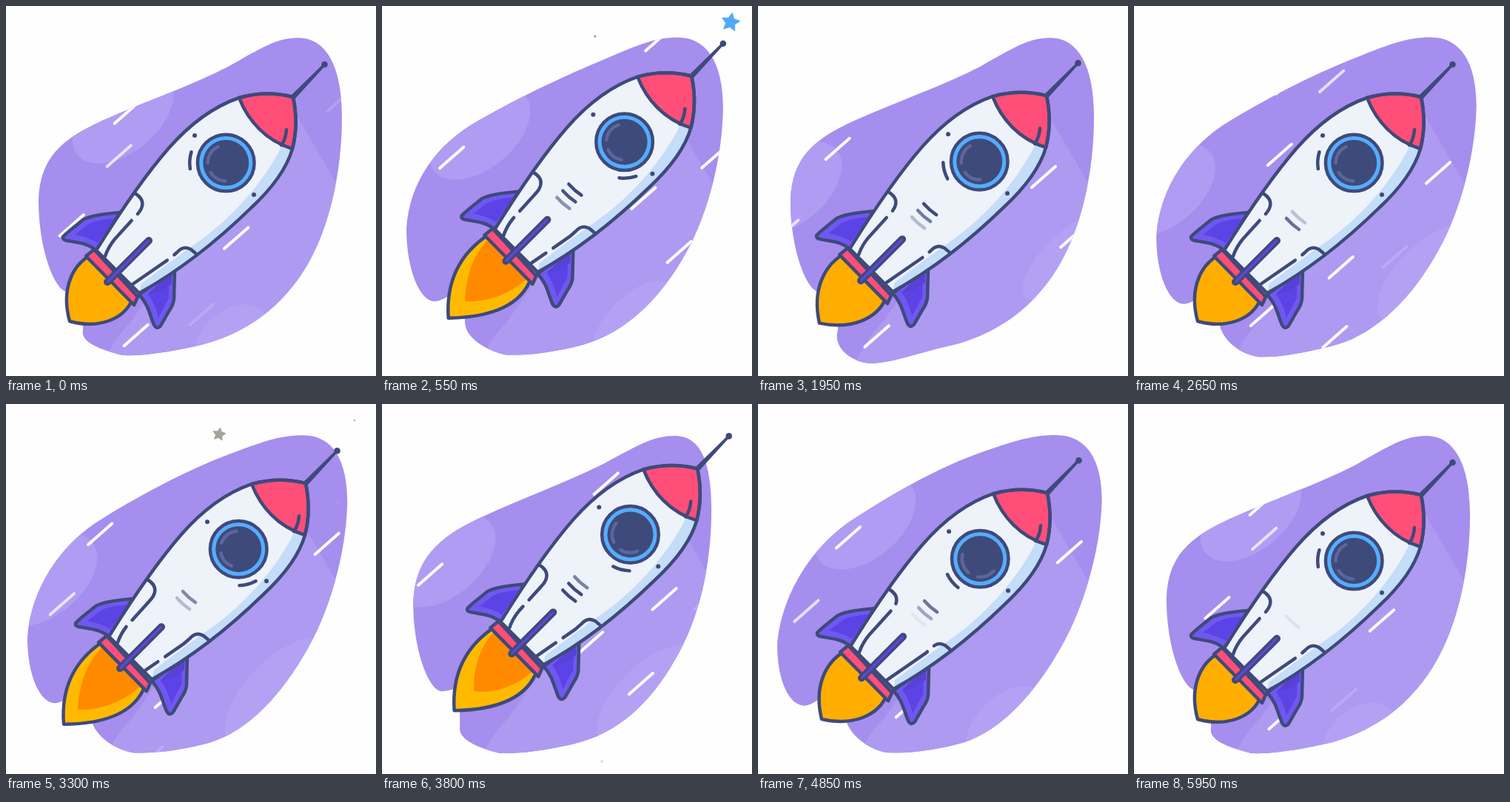
An HTML page that plays this animation: 500 px wide and 500 px high, repeating every 6050 ms.

```html
<!DOCTYPE html>
<html lang="en">
<head>
<meta charset="utf-8">
<title>Rocket</title>
<style>
  html, body { margin: 0; width: 100%; height: 100%; overflow: hidden; background: #fefefe; }
  svg { display: block; width: 100vw; height: 100vh; }
  .ink { stroke: #3e4a7a; stroke-width: 4.5; stroke-linecap: round; stroke-linejoin: round; }
  .line { fill: none; }
  .dark { fill: #3e4a7a; }
</style>
</head>
<body>
<svg viewBox="0 0 500 500">
  <defs>
    <clipPath id="blobClip"><path id="clipShape"/></clipPath>
    <clipPath id="hullClip"><path id="hullShape" d="M122 330C150 285 185 232 220 192C250 158 283 135 315 124C340 117 365 117 388 123C393 147 393 170 387 193C379 221 360 246 331 273C292 311 238 356 180 388Z"/></clipPath>
  </defs>
  <g clip-path="url(#blobClip)">
    <rect width="500" height="500" fill="#a58eee"/>
    <path d="M390 143L470 280V500H125Q140 455 170 425L230 340Z" fill="#ae9af1"/>
    <ellipse id="cloudLeft" rx="80" ry="47" fill="#b09cf2"/>
    <ellipse id="cloudRight" fill="#b4a1f3"/>
    <g id="streaks" transform="rotate(-41.4)" stroke="#fff" stroke-width="4" stroke-linecap="round"/>
  </g>
  <g id="rocket">
    <path id="flame" class="ink"/>
    <path id="core" fill="#ff8a00"/>
    <path d="M154 279C130 281 112 284 104 289C92 299 82 306 77 312Q76 316 82 317C98 320 110 320 123 331Z" fill="#6f58f0" class="ink"/>
    <path d="M148 287C130 288 118 291 111 295L93 309Q110 312 124 320Z" fill="#5c43e6"/>
    <path d="M228 355L227 396Q226 404 221 411L209 432Q204 438 200 431C193 414 193 405 180 390Z" fill="#6f58f0" class="ink"/>
    <path d="M221 366L220 395L206 421Q202 403 192 389Z" fill="#5c43e6"/>
    <path d="M224 358V375Q205 390 193 388Z" fill="#5741d6"/>
    <use href="#hullShape" fill="#eef2f9"/>
    <path d="M374 186C355 228 310 285 255 322C230 340 205 358 182 376L180 395L340 300L400 190Z" fill="#c4ddf8" clip-path="url(#hullClip)"/>
    <path d="M315 124C327 155 351 182 387 193C393 170 393 147 388 123C365 117 340 117 315 124Z" fill="#ff4f78" class="ink"/>
    <path d="M379 167Q378 180 372 188" class="ink line"/>
    <use href="#hullShape" class="ink line"/>
    <path d="M385 121L390 126L431.6 80.4L429 78Z" class="dark"/>
    <circle cx="430.5" cy="79" r="4.3" class="dark"/>
    <circle cx="255" cy="175" r="3" class="dark"/>
    <circle cx="335" cy="255" r="3" class="dark"/>
    <circle cx="297.2" cy="212" r="38.3" fill="#55adfd" class="ink"/>
    <circle cx="297.2" cy="212" r="31" class="dark"/>
    <g id="glints" class="line" stroke="#5c669c" stroke-width="4.5" stroke-linecap="round"/>
    <path id="orbit" class="ink line"/>
    <g id="stripes" class="ink"/>
    <path class="ink line seam" d="M174 253Q186 260 184 270Q183 276 176 283L147 315Q138 326 134 338"/>
    <path class="ink line seam" d="M256 334L250 329Q240 323 231 333L223 340L171 376"/>
    <path d="M108 338L119 329L178 393L173 404Z" fill="#ff4f78" class="ink"/>
    <path d="M137 373L193 317" class="ink" style="stroke-width:10"/>
    <path d="M138 372L192 318" stroke="#5d47d8" stroke-width="3.5" stroke-linecap="round"/>
  </g>
  <g id="sparks"></g>
</svg>
<script>
const LOOP = 6050, STEP = 50;
const $ = id => document.getElementById(id);
const wrap = (v, n) => ((v % n) + n) % n;
const clamp = v => Math.max(0, Math.min(1, v));
const set = (el, attrs) => { for (const k in attrs) el.setAttribute(k, attrs[k]); };

function add(parent, tag, attrs) {
  const el = document.createElementNS('http://www.w3.org/2000/svg', tag);
  set(el, attrs);
  return parent.appendChild(el);
}

// Smooth periodic curve through [time, value] points, without overshoot.
function curve(period, points) {
  const n = points.length;
  const at = i => {
    const p = points[wrap(i, n)];
    return [p[0] + Math.floor(i / n) * period, p[1]];
  };
  const rise = i => {
    const [a, b] = [at(i), at(i + 1)];
    return (b[1] - a[1]) / (b[0] - a[0]);
  };
  const slope = i => {
    const [a, b] = [rise(i - 1), rise(i)];
    return a * b <= 0 ? 0 : 2 * a * b / (a + b);
  };
  return time => {
    const t = wrap(time, period);
    let i = n - 1;
    while (i > 0 && points[i][0] > t) i--;
    const [a, b] = [at(i), at(i + 1)];
    const h = b[0] - a[0], s = (t - a[0]) / h, r = 1 - s;
    return a[1] * (1 + 2 * s) * r * r + b[1] * s * s * (3 - 2 * s)
      + h * s * r * (slope(i) * r - slope(i + 1) * s);
  };
}

const lift = curve(3000, [[0, 0], [300, 17], [700, 36], [1050, 41.5], [1150, 41], [1350, 31], [1850, 3], [1950, 2], [2300, 0]]);
const thrust = curve(3000, [[0, 0], [300, 25], [700, 27], [1150, 21], [1350, 10], [1850, 3], [1950, 5], [2300, 0]]);
const coreTip = curve(3000, [[0, -30], [300, 6], [1150, -5], [1350, -6], [1800, -30]]);
const orbitAngle = curve(3000, [[0, 184], [300, 75], [1150, 122], [1350, 122], [1850, 141], [1950, 165], [2200, 184]]);
const glintAngle = curve(3000, [[0, 0], [300, 20], [1150, -82], [1350, -128], [1850, -50], [1950, -5], [2200, 0]]);
const seamGap = curve(3000, [[0, 14], [300, 50], [1150, 34], [1350, 57], [1850, 4], [1950, 11], [2200, 14]]);
const drift = curve(6000, [[0, 0], [1150, 72], [1950, 113], [2500, 117], [3300, 103], [4350, 33], [4850, 13], [5950, 0]]);

const cloudTimes = [0, 1150, 1950, 3300, 4350, 4850, 5950];
const cloudCurve = (...values) => curve(6000, values.map((v, i) => [cloudTimes[i], v]));
const cloud = {
  cx: cloudCurve(305, 390, 415, 370, 352, 335, 305),
  cy: cloudCurve(455, 376, 340, 390, 405, 435, 455),
  rx: cloudCurve(60, 80, 75, 95, 80, 65, 60),
  ry: cloudCurve(42, 22, 30, 45, 42, 40, 42)
};

// Resting outlines share their left side; the wide one has the same segments.
const blobRight = 'M395 43C432 43 454 80 454 150C454 230 435 300 410 345C375 408 320 446 255 460';
const blobSlimRight = 'M395 43C430 43 443 80 443 145C443 220 428 290 396 345C362 405 318 446 255 460';
const blobFoot = 'C215 469 180 473 158 472C130 465 100 455 104 438';
const blobSagFoot = 'C215 469 180 483 152 483C125 482 100 460 108 438';
const blobLeft = 'C104 372 104 386 82 386C66 384 44 330 44 262C46 205 75 180 130 155C190 128 250 108 300 82C345 57 365 43 395 43Z';
const blobRest = blobRight + blobFoot + blobLeft;
const blobSag = blobRight + blobSagFoot + blobLeft;
const blobSlim = blobSlimRight + blobFoot + blobLeft;
const blobWide = 'M403 42C445 42 466 75 466 130C464 200 438 285 403 340C366 402 318 449 269 460C230 470 200 472 175 471C145 466 118 440 118 416C118 352 85 408 62 409C40 409 25 375 25 330C30 260 75 190 130 155C190 115 250 82 300 65C345 50 370 42 403 42Z';

function mixPath(a, b, k) {
  const target = b.match(/\d+/g);
  let i = 0;
  return a.replace(/\d+/g, v => (+v + (target[i++] - v) * k).toFixed(2) + ' ');
}

// row: distance across, x: place at time 0, v: speed, bend: change of speed, from: start of the pass
const STREAK_PERIOD = 1507.5;
const streaks = [
  { row: 216, x: 5, v: .166, from: -440 },
  { row: 253, x: -41, v: .385, bend: .00009, alpha: .72 },
  { row: 281, x: -151, v: .395 },
  { row: 441, x: 4.5, v: .405, bend: -.00011 },
  { row: 450, x: -184, v: .38, from: -1200 },
  { row: 487.5, x: -99, v: .322, alpha: .16 },
  { row: 428.5, x: 294, v: .404, from: 0 },
  { row: 515, x: 221, v: .293, from: 0 },
  { row: 394, x: 232, v: .3, from: -100, alpha: .16 }
];
for (const s of streaks) s.el = add($('streaks'), 'line', { x2: 43, y1: s.row, y2: s.row, opacity: s.alpha || 1 });

const stripes = [
  { x: 222, y: 269, on: 50, off: 650 },
  { x: 214, y: 278, on: 170, off: 840 },
  { x: 206, y: 287, on: 320, off: 1050 }
];
for (const s of stripes) s.el = add($('stripes'), 'path', { class: 'line', d: `M${s.x} ${s.y}q8 9 17 15` });

const sparks = [
  { x: 167, y: 246, start: 850, span: 520, size: 13, color: '#ff4f78', rays: 4 },
  { x: 85, y: 362, start: 1270, span: 400, size: 8, color: '#ff4f78', rays: 6 },
  { x: 297, y: 483, start: 780, span: 390, size: 13, color: '#8c7df0', rays: 4 },
  { x: 447, y: 134, start: 60, span: 265, size: 8, color: '#c3b5f7', rays: 4 },
  { x: 432, y: 287, start: 980, span: 280, size: 5, color: '#4fa9f9' },
  { x: 471, y: 22, start: 290, span: 480, size: 13, color: '#4fa9f9' },
  { x: 288, y: 41, start: 20, span: 560, size: 9, color: '#a3a399', fall: 22 }
];
for (const s of sparks) s.el = add($('sparks'), 'path', { fill: s.rays ? 'none' : s.color, stroke: s.color, 'stroke-linejoin': 'round' });

const polar = (cx, cy, r, deg) => {
  const a = deg * Math.PI / 180;
  return `${(cx + r * Math.cos(a)).toFixed(2)} ${(cy + r * Math.sin(a)).toFixed(2)}`;
};
const arc = (r, mid, span) =>
  `M${polar(297.2, 212, r, mid - span / 2)}A${r} ${r} 0 0 1 ${polar(297.2, 212, r, mid + span / 2)}`;
add($('glints'), 'path', { d: arc(24.5, 120, 55) });
add($('glints'), 'path', { d: arc(24.5, 212, 64) });

function sparkPath(s, size) {
  let d = '';
  if (s.rays) {
    for (let i = 0; i < s.rays; i++) {
      const a = 360 / s.rays * i - 20;
      d += `M${polar(0, 0, size * .45, a)}L${polar(0, 0, size, a)}`;
    }
    return d;
  }
  for (let i = 0; i < 10; i++) d += (i ? 'L' : 'M') + polar(0, 0, i % 2 ? size * .5 : size, i * 36 - 80);
  return d + 'Z';
}

function drawBlob(t) {
  const k = (1 - Math.cos(t * Math.PI / 1000)) / 2;
  const rest = [blobRest, blobSag, blobSlim][Math.round(t / 2000) % 3];
  set($('clipShape'), { d: mixPath(rest, blobWide, k) });
  const s = drift(t);
  set($('cloudLeft'), { transform: `translate(${158 - s} ${150 + s * .85}) rotate(-40)` });
  set($('cloudRight'), {
    rx: cloud.rx(t), ry: cloud.ry(t),
    transform: `translate(${cloud.cx(t)} ${cloud.cy(t)}) rotate(-45)`
  });
  for (const { el, x, v, bend = 0, from = -1000 } of streaks) {
    const p = wrap(t - from, STREAK_PERIOD) + from;
    set(el, { transform: `translate(${x - v * p + bend * p * p} 0)` });
  }
}

function drawRocket(t) {
  const up = lift(t), f = thrust(t), c = coreTip(t);
  set($('rocket'), { transform: `translate(${up} ${-up * .93})` });
  set($('flame'), {
    fill: f > 8 ? '#ffba00' : '#ffae00',
    d: `M114 337C${90 - f * .3} ${350 + f * .3} ${74 - f * .7} ${382 + f * .4} ${86 - f} ${426 + f * .9}`
      + `C${126 - f * .4} ${437 + f * .45} ${160 - f * .1} ${423 + f * .4} 171 396Z`
  });
  set($('core'), {
    opacity: clamp((c + 26) / 16),
    d: `M116 341C${98 - c * .3} ${358 + c * .3} ${84 - c * .4} ${386 + c * .5} ${86 - c} ${424 + c * .85}`
      + `C${118 - c * .5} ${427 + c * .4} ${145 - c * .3} ${415 + c * .3} 166 396Z`
  });
  set($('orbit'), { d: arc(49, orbitAngle(t), 27) });
  set($('glints'), { transform: `rotate(${glintAngle(t)} 297.2 212)` });
  const gap = seamGap(t);
  document.querySelectorAll('.seam').forEach(el => set(el, { 'stroke-dasharray': `${20 + gap} 12 200` }));
  const p = t % 1500;
  for (const s of stripes) set(s.el, { opacity: Math.min(clamp((p - s.on) / 400), clamp(1 - (p - s.off) / 440)) });
}

function drawSparks(t) {
  for (const s of sparks) {
    const p = (t % 3000 - s.start) / s.span;
    const live = p > 0 && p < 1;
    set(s.el, { visibility: live ? 'visible' : 'hidden' });
    if (!live) continue;
    const size = s.size * Math.sin(p * Math.PI);
    const y = s.y - (s.fall || 0) * clamp(1 - p * 2);
    set(s.el, {
      d: sparkPath(s, size),
      'stroke-width': s.rays ? size * .38 : 1,
      transform: `translate(${s.x} ${y})`
    });
  }
}

function draw(now) {
  const t = Math.min(Math.floor(wrap(now, LOOP) / STEP) * STEP, LOOP - 2 * STEP);
  drawBlob(t);
  drawRocket(t);
  drawSparks(t);
}

let begin;
function tick(now) {
  begin ??= now;
  draw(now - begin);
  requestAnimationFrame(tick);
}
draw(0);
requestAnimationFrame(tick);
</script>
</body>
</html>
```
